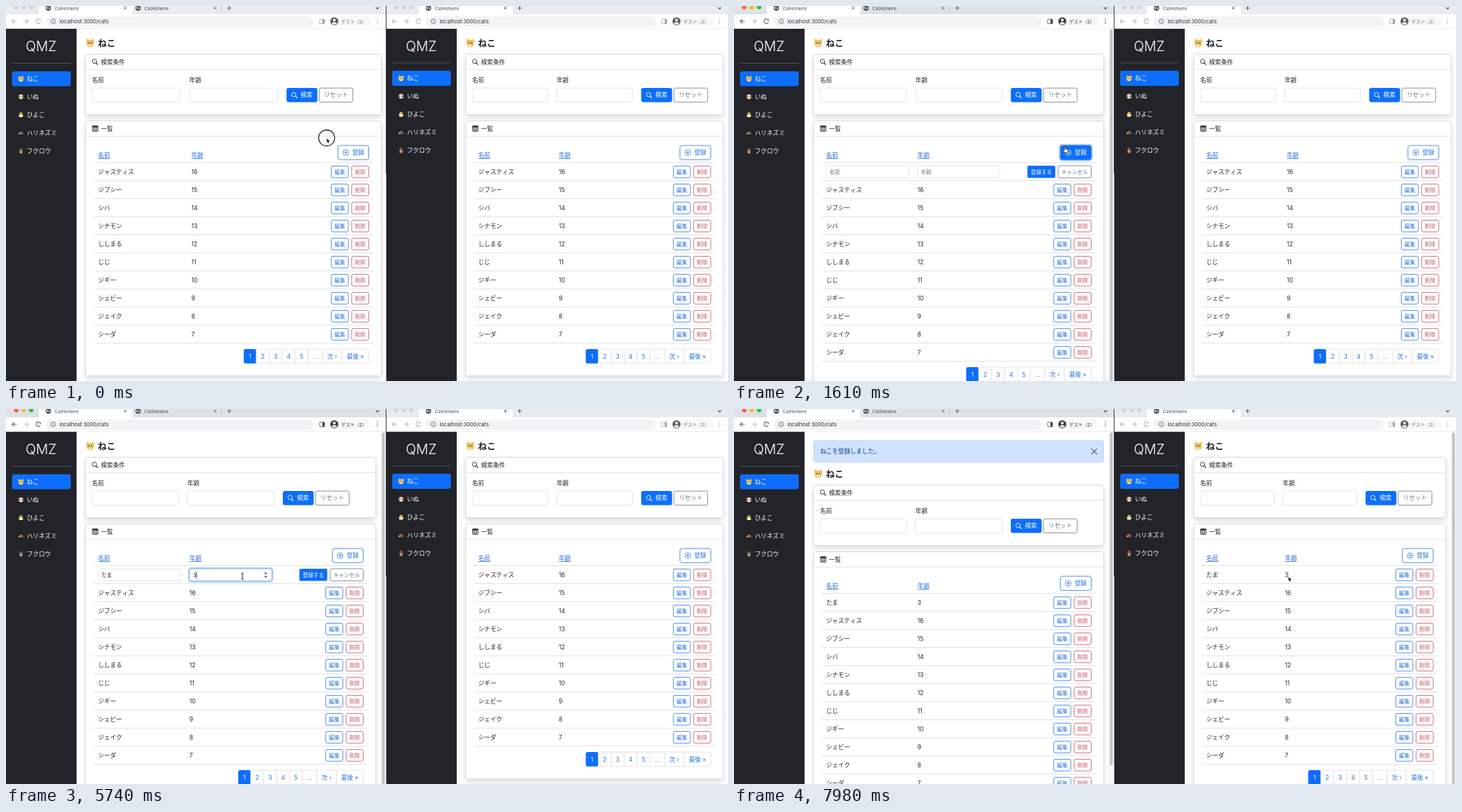
Recreate the animation shown at these times as an HTML page with a canvas. Size 1038x540 px, loop 8000 ms.

```html
<!DOCTYPE html>
<html lang="ja">
<head>
<meta charset="utf-8">
<style>
html, body { margin: 0; width: 100%; height: 100%; overflow: hidden; background: #fff; }
canvas { display: block; }
</style>
</head>
<body>
<canvas id="stage" width="1038" height="540"></canvas>
<script>
const c = document.getElementById('stage').getContext('2d');
const FONT = 'Inter, "Noto Sans CJK JP", "Noto Sans CJK", sans-serif';
const BLUE = '#0d6efd', EDGE = '#2470e4', RED = '#c4505c', GRAY = '#6c757d', INK = '#212529', LINE = '#d9dde1';
const CATS = ['ジャスティス', 'ジプシー', 'シバ', 'シナモン', 'ししまる', 'じじ', 'ジギー', 'シェビー', 'ジェイク', 'シーダ']
  .map((name, i) => [name, 16 - i]);
const MENU = ['ねこ', 'いぬ', 'ひよこ', 'ハリネズミ', 'フクロウ'];
const LOOP = 8000, STEP = 70;
let ox = 0; // left edge of the window being drawn

const ramp = (t, start, len = 150) => Math.max(0, Math.min(1, (t - start) / len));
const between = (t, a, b) => t >= a && t < b;

function text(s, x, y, size = 8.6, color = INK, align = 'left', weight = 400) {
  c.font = `${weight} ${size}px ${FONT}`;
  c.fillStyle = color;
  c.textAlign = align;
  c.fillText(s, ox + x, y + size * 0.37);
}
function box(l, t, r, b, fill, line, rad = 3) {
  c.beginPath();
  c.roundRect(ox + l, t, r - l, b - t, rad);
  if (fill) { c.fillStyle = fill; c.fill(); }
  if (line) { c.strokeStyle = line; c.lineWidth = 0.8; c.stroke(); }
}
function rect(l, t, r, b, fill) {
  c.fillStyle = fill;
  c.fillRect(ox + l, t, r - l, b - t);
}
function dot(x, y, r, fill, line, width = 0.9) {
  c.beginPath();
  c.arc(ox + x, y, r, 0, 7);
  if (fill) { c.fillStyle = fill; c.fill(); }
  if (line) { c.strokeStyle = line; c.lineWidth = width; c.stroke(); }
}
// points are flat x, y pairs relative to (x, y)
function poly(x, y, pts, line, fill, width = 0.9) {
  c.beginPath();
  for (let i = 0; i < pts.length; i += 2) c.lineTo(ox + x + pts[i], y + pts[i + 1]);
  if (fill) { c.closePath(); c.fillStyle = fill; c.fill(); }
  if (line) { c.strokeStyle = line; c.lineWidth = width; c.stroke(); }
}
function cross(x, y, r, color, width) {
  poly(x, y, [-r, -r, r, r], color, null, width);
  poly(x, y, [-r, r, r, -r], color, null, width);
}
function plus(x, y, r, color) {
  poly(x, y, [-r, 0, r, 0], color);
  poly(x, y, [0, -r, 0, r], color);
}
function ring(l, t, r, b, alpha = 1) {
  c.save();
  c.globalAlpha = alpha;
  c.beginPath();
  c.roundRect(ox + l - 1, t - 1, r - l + 2, b - t + 2, 3.5);
  c.strokeStyle = '#a7caff';
  c.lineWidth = 2.2;
  c.stroke();
  c.restore();
}
function magnifier(x, y, color) {
  dot(x - 0.8, y - 0.8, 3.1, null, color);
  poly(x, y, [1.5, 1.5, 4.2, 4.2], color, null, 1.2);
}
function button(l, t, r, b, label, color, solid, size = 7.6) {
  box(l, t, r, b, solid ? color : '#fff', solid ? null : color, 2.2);
  text(label, (l + r) / 2, (t + b) / 2, size, solid ? '#fff' : color, 'center', solid ? 500 : 400);
}

function animal(kind, x, y, s) {
  const coat = ['#f3c156', '#e8d3bd', '#fcd04b', '#7d5f4c', '#8d6a5c'][kind];
  const at = (dx, dy, r, color) => dot(x + dx * s, y + dy * s, r * s, color);
  if (kind === 0) {
    poly(x, y, [-4.5 * s, 0, -4 * s, -5 * s, 0, -2.5 * s, 4 * s, -5 * s, 4.5 * s, 0], null, coat);
    at(0, 0.8, 4.2, coat);
    at(0, 2.4, 1.8, '#fff3cf');
  } else if (kind === 1) {
    at(0, 0, 4, coat);
    at(-3.6, 0, 1.5, '#8b5a3c');
    at(3.6, 0, 1.5, '#8b5a3c');
    at(0, 1.8, 1.8, '#fff');
  } else if (kind === 2) {
    at(0, -1.2, 3, coat);
    poly(x, y, [-4.3 * s, 0.5 * s, 4.3 * s, 0.5 * s, 2.5 * s, 4 * s, -2.5 * s, 4 * s], null, '#f3eee6');
  } else if (kind === 3) {
    poly(x, y, [-4.5 * s, 2.5 * s, -2.5 * s, -1.5 * s, 1 * s, -2.8 * s, 4.3 * s, 0.5 * s, 4 * s, 2.8 * s], null, coat);
    at(-2.8, 1.4, 1.4, '#d0a27a');
  } else {
    at(0, -1.6, 2.8, coat);
    at(0, 1.6, 3, coat);
    at(0, 2, 1.5, '#d8b79c');
  }
  if (kind !== 3) for (const dx of [-1.5, 1.5]) at(dx, kind > 1 ? -1.8 : 0.1, 0.65, '#2d2420');
  at(0, kind > 1 ? -0.6 : 1.7, 0.6, kind > 1 ? '#f08a24' : '#4c302a');
}

function sidebar(dy) {
  rect(0, 32.5, 101.5, 540, '#222429');
  text('QMZ', 50.5, 58 + dy, 19.5, '#fff', 'center', 300);
  rect(8.7, 82.2 + dy, 93, 83 + dy, '#5c5e62');
  box(8.7, 94 + dy, 93, 115.6 + dy, BLUE);
  MENU.forEach((name, i) => {
    const y = 104.7 + 26 * i + dy;
    animal(i, 21.5, y, 0.85);
    text(name, 30, y, 8.6, '#fff');
  });
}

function card(t, b, r, title) {
  c.save();
  c.shadowColor = 'rgba(0,0,0,.15)';
  c.shadowBlur = 8;
  c.shadowOffsetY = 4;
  box(114.5, t, r, b, '#fff');
  c.restore();
  box(114.5, t, r, b, '#fff', '#d3d4d5');
  rect(114.5, t + 21.9, r, t + 22.6, '#d3d4d5');
  text(title, 136.5, t + 11.2);
}

function tableIcon(x, y) {
  box(x - 4, y - 4, x + 4, y + 4, '#fff', INK, 1);
  rect(x - 4, y - 4, x + 4, y - 2, INK);
  for (const k of [-1.4, 1.4]) {
    poly(x, y, [k, -2, k, 4], INK, null, 0.7);
    poly(x, y, [-4, k + 0.7, 4, k + 0.7], INK, null, 0.7);
  }
}

function pager(right, y) {
  let x = right - 179.7;
  ['1', '2', '3', '4', '5', '…', '次 ›', '最後 »'].forEach((label, i) => {
    const w = [18, 18.7, 18.5, 18.5, 18.5, 21, 28, 38.5][i];
    box(x, y, x + w, y + 20.6, i ? '#fff' : BLUE, i ? LINE : null, i % 7 ? 0 : 2.5);
    text(label, x + w / 2, y + 10.3, 8.6, i === 0 ? '#fff' : i === 5 ? GRAY : EDGE, 'center');
    x += w;
  });
}

function registerButton(r, y, hover, focus) {
  const l = r - 62.3, right = r - 18;
  if (focus) ring(l, y, right, y + 20.4, focus);
  box(l, y, right, y + 20.4, '#fff', EDGE);
  c.save();
  c.globalAlpha = hover;
  box(l, y, right, y + 20.4, BLUE);
  c.restore();
  const color = hover > 0.5 ? '#fff' : EDGE;
  dot(l + 11.3, y + 10.2, 4, null, color, 0.8);
  plus(l + 11.3, y + 10.2, 2.1, color);
  text('登録', l + 20.5, y + 10.2, 8.6, color);
}

function field(l, r, value, hint, focused, caret) {
  if (focused) ring(l, 230.2, r, 247.6);
  box(l, 230.2, r, 247.6, '#fff', focused ? '#86b7fe' : LINE, 2.2);
  text(value || hint, l + 4.8, 239, 7.6, value ? INK : '#73797f');
  if (caret) {
    const w = value ? c.measureText(value).width : 0;
    rect(l + 5 + w, 234, l + 5.8 + w, 244, '#222');
  }
}

function typedName(t) {
  return t < 3290 ? '' : t < 3430 ? 'ｔ' : t < 3500 ? 'た' : t < 3570 ? 'たｍ' : 'たま';
}

function form(t, r, col) {
  const inName = between(t, 2240, 4690), inAge = between(t, 4690, 6440);
  const nameCaret = inName && !between(t, 2800, 3290) && !between(t, 4410, 4690);
  const ageCaret = inAge && !between(t, 5180, 5460) && !between(t, 5950, 6370);
  field(132.4, 250.8, typedName(t), '名前', inName, nameCaret);
  field(col, col + 118.3, t >= 5460 ? '3' : '', '年齢', inAge, ageCaret);
  if (inAge || between(t, 4480, 4690)) {
    poly(373.3, 236.5, [-2.2, 1, 0, -1.6, 2.2, 1], null, '#444');
    poly(373.3, 241.5, [-2.2, -1, 0, 1.6, 2.2, -1], null, '#444');
  }
  const submit = t >= 6510 ? '#6096e5' : t >= 6300 ? '#0b5ed7' : BLUE;
  button(r - 109.7, 230, r - 69.7, 247.6, '登録する', submit, true);
  button(r - 65.5, 230, r - 18, 247.6, 'キャンセル', GRAY);
}

function candidates(t) {
  if (between(t, 3290, 3850)) rect(137, 244, 137 + 7.6 * typedName(t).length, 245, '#333');
  if (!between(t, 3430, 3850)) return;
  box(133, 251, 200, 288, '#f6f6f6', '#c8c8c8');
  rect(134, 252, 199, 269, '#d5e4fb');
  text(typedName(t), 140, 260.5, 7.6);
  text('玉', 140, 278.5, 7.6);
}

// r is the right edge of the cards, local to the window
function page(r, { rows, dy = 0, formTime = -1, hover = 0, focus = 0 }) {
  const col = 132.5 + (r - 137.5) / 3, step = (r - 120) / 3;
  if (dy) {
    box(114.5, 45.2, r, 76.6, '#cfe2ff', '#b6d2fb');
    text('ねこを登録しました。', 124, 61, 8.6, '#163f80');
    cross(r - 13.7, 61.2, 4, '#35547f', 1.1);
  }
  animal(0, 121, 53 + dy, 1.25);
  text('ねこ', 132, 53 + dy, 12.8, INK, 'left', 600);

  card(69.5 + dy, 156.5 + dy, r, '検索条件');
  magnifier(128, 80.5 + dy, INK);
  ['名前', '年齢'].forEach((label, i) => {
    const x = 123.7 + i * step;
    text(label, x, 107 + dy);
    box(x, 118.2 + dy, x + step - 12.6, 138.6 + dy, '#fff', LINE);
  });
  const bx = 123.6 + 2 * step;
  box(bx, 118 + dy, bx + 44.4, 138.6 + dy, BLUE);
  magnifier(bx + 11.3, 128.3 + dy, '#fff');
  text('検索', bx + 20.3, 128.3 + dy, 8.6, '#fff', 'left', 500);
  button(bx + 47, 118.2 + dy, bx + 95.4, 138.4 + dy, 'リセット', GRAY, false, 8.6);

  const shown = rows.length + (formTime >= 0 ? 1 : 0), extra = 26 * (shown - 10);
  card(165.5 + dy, 532.4 + dy + extra, r, '一覧');
  tableIcon(128.2, 176.6 + dy);

  for (const [label, x] of [['名前', 132.5], ['年齢', col]]) {
    text(label, x, 215 + dy, 8.6, EDGE);
    rect(x, 219 + dy, x + 17.3, 219.8 + dy, EDGE);
  }
  registerButton(r, 200.9 + dy, hover, focus);
  for (let i = 0; i <= shown; i++) rect(126, 225.2 + 26 * i + dy, r - 11.5, 226 + 26 * i + dy, LINE);
  if (formTime >= 0) form(formTime, r, col);
  rows.forEach(([name, age], i) => {
    const y = 239 + 26 * (i + shown - rows.length) + dy;
    text(name, 132.5, y);
    text(age, col, y);
    button(r - 71.8, y - 8.6, r - 47.3, y + 8.2, '編集', EDGE);
    button(r - 42.5, y - 8.6, r - 18, y + 8.2, '削除', RED);
  });
  pager(r - 18, 494.1 + dy + extra);
  if (formTime >= 0) candidates(formTime);
}

function scrollbar(e, bottom) {
  rect(e - 7, 32, e, 540, '#fafafa');
  rect(e - 7, 32, e - 6.3, 540, '#e8e8e8');
  box(e - 5.5, 34, e - 1.5, bottom, '#c1c1c1', null, 2);
}

function tab(x, color) {
  dot(x + 14, 3, 3.9, color);
  poly(x + 14, 3, [-2.6, -1.6, 0, -0.8, -0.8, 1, -2.4, 0.6], null, '#e3e5e8');
  poly(x + 14, 3, [0.8, 0, 2.8, -0.6, 1.6, 2.6], null, '#e3e5e8');
  text('CatHotwire', x + 23, 3.3, 6.5, '#45494d');
  cross(x + 124.5, 3, 1.9, '#55595d');
}

function chrome(e, tabs, active) {
  const ink = active ? '#46494d' : '#a3a6aa', nav = active ? '#5f6368' : '#b4b7ba';
  rect(0, 0, e, 13, active ? '#dee1e6' : '#e9ebee');
  ['#ff5f57', '#febc2e', '#28c840'].forEach((color, i) => dot(14.7 + 10.7 * i, 1.6, 3.3, active ? color : '#d3d5d8'));
  box(47, -6, 182, 13, '#fff', null, 4);
  rect(0, 12, e, 32.5, '#fff');
  rect(101.5, 32, e, 32.6, '#e1e3e6');
  for (let i = 0; i < tabs; i++) tab(47 + 129 * i, '#5a5e63');
  if (tabs > 1) rect(309, 0, 309.7, 8, '#aeb2b7');
  plus(192 + 129 * (tabs - 1), 3, 3, '#4a4e52');
  poly(e - 12, 3, [-2.2, -1, 0, 1.2, 2.2, -1], '#4a4e52', null, 1.1);

  poly(12, 22, [0, -3.2, -3.2, 0, 0, 3.2], nav, null, 1.1);
  poly(12, 22, [-3.2, 0, 3.5, 0], nav, null, 1.1);
  poly(29, 22, [0, -3.2, 3.2, 0, 0, 3.2], '#b9bcbf', null, 1.1);
  poly(29, 22, [-3.5, 0, 3.2, 0], '#b9bcbf', null, 1.1);
  c.beginPath();
  c.arc(ox + 46.5, 22, 3.2, 0.4, 5.4);
  c.strokeStyle = nav;
  c.lineWidth = 1.1;
  c.stroke();
  poly(46.5, 22, [1, -0.8, 3.6, -0.8, 3.6, -3.6], null, nav);

  box(57, 15, e - 104, 29.8, '#f1f3f4', null, 7.4);
  dot(68, 22, 3.4, null, '#5f6368', 0.8);
  rect(67.6, 21.5, 68.4, 24, '#5f6368');
  rect(67.6, 20, 68.4, 20.9, '#5f6368');
  text('localhost:3000/cats', 77, 22.2, 7.5, '#2b2e31');
  box(e - 95.2, 19, e - 88, 25.4, '#fff', ink, 1);
  rect(e - 91, 19, e - 88, 25.4, ink);
  box(e - 81, 15, e - 22, 29, '#f6f7f8', null, 7);
  dot(e - 74, 22, 5.8, active ? '#3f4347' : '#5c6064');
  dot(e - 74, 20.2, 1.9, '#fff');
  c.beginPath();
  c.ellipse(ox + e - 74, 25, 3.3, 1.7, 0, 0, 7);
  c.fillStyle = '#fff';
  c.fill();
  text('ゲスト（2）', e - 64, 22.2, 6.5, active ? '#3c4043' : '#73777b', 'left', 500);
  for (const dy of [-3, 0, 3]) dot(e - 12, 22 + dy, 0.8, ink);
}

const PATH = [[0, 461, 190], [70, 461, 190], [490, 484, 204], [1540, 484, 204], [2240, 212, 247], [3290, 212, 247],
  [4130, 231, 244], [4200, 231, 244], [4550, 289, 244], [5600, 289, 244], [5740, 340, 241], [6370, 426, 240],
  [7280, 426, 240], [7490, 740, 172], [7630, 740, 172], [7980, 797, 241], [LOOP, 797, 241]];

function pointerAt(t) {
  const i = PATH.findIndex(p => p[0] > t), [t0, x0, y0] = PATH[i - 1], [t1, x1, y1] = PATH[i];
  let k = (t - t0) / (t1 - t0);
  if (t0 < 5600) k = k * k * (3 - 2 * k);
  return [x0 + (x1 - x0) * k, y0 + (y1 - y0) * k];
}

function pointer(t) {
  if (between(t, 3290, 4200) || between(t, 5040, 5600)) return;
  const [x, y] = pointerAt(t);
  const inside = (l, top, r, b) => t < 6790 && between(x, l, r) && between(y, top, b);
  if (t < 70) dot(x, y, 11.5, null, '#222', 1.3);
  if (inside(469, 201, 522, 222) || (inside(422, 230, 462, 248) && t < 6510)) {
    poly(x, y, [-1.5, -3, 0, -3, 0.4, 0.5, 4, 1.4, 4, 4, 2.8, 6, -1.4, 6, -3.8, 2, -2.8, 1.4, -1.3, 2.8], '#222', '#fff', 0.9);
  } else if (t >= 770 && (inside(132, 230, 252, 249) || inside(264, 230, 383, 249))) {
    poly(x, y, [0, -4, 0, 4], '#222', null, 1.1);
    for (const s of [-1, 1]) poly(x, y, [-2, 4.6 * s, 0, 3.8 * s, 2, 4.6 * s], '#222');
  } else {
    poly(x, y, [0, 0, 0, 7.5, 1.7, 6, 2.8, 8.5, 4.1, 7.9, 3, 5.5, 5.2, 5.3], '#fff', '#000', 0.8);
  }
}

function draw(t) {
  const open = t >= 770, done = t >= 6790;
  const rows = done ? [['たま', 3], ...CATS] : CATS;
  c.fillStyle = '#fff';
  c.fillRect(0, 0, 1038, 540);

  ox = 546.5;
  page(done ? 476.7 : 484.7, { rows });
  sidebar(-0.7);
  if (done) scrollbar(491.5, 545);
  chrome(491.5, 1, false);

  ox = 0;
  c.save();
  c.beginPath();
  c.rect(0, 0, 546, 540);
  c.clip();
  page(open ? 531.5 : 539.5, {
    rows,
    dy: done ? 40 : 0,
    formTime: open && !done ? t : -1,
    hover: ramp(t, 350) - ramp(t, 1610),
    focus: ramp(t, 700) - ramp(t, 2240, 140)
  });
  sidebar(0);
  if (open) scrollbar(546, done ? 513 : 540);
  chrome(546, 2, t >= 140);
  c.restore();
  rect(546, 0, 547, 241, '#3a3c40');
  rect(546, 241, 547, 540, '#a8aaad');
  pointer(t);
}

function tick(now) {
  draw(Math.floor((now % LOOP) / STEP) * STEP);
  requestAnimationFrame(tick);
}
requestAnimationFrame(tick);
</script>
</body>
</html>
```
